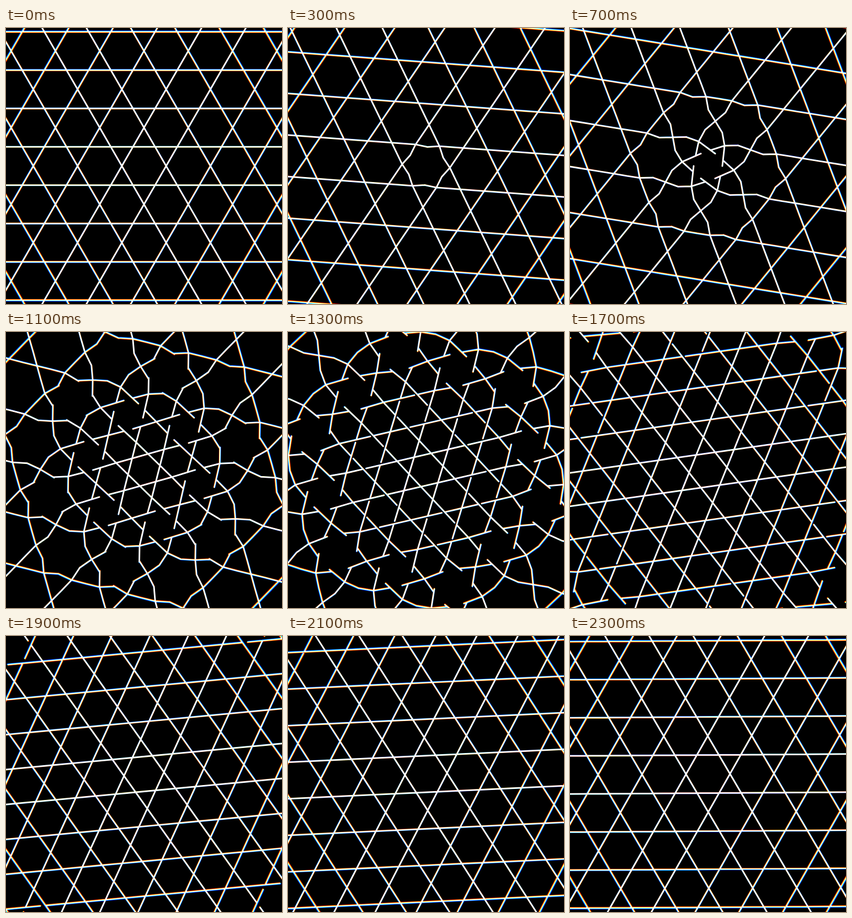
Recreate the animation shown at these times as an HTML page with a canvas. Size 500x500 px, loop 2400 ms.

```html
<!DOCTYPE html>
<html>
<head>
<meta charset="utf-8">
<style>
html, body { margin: 0; width: 100%; height: 100%; overflow: hidden; background: #000; }
canvas { display: block; }
</style>
</head>
<body>
<canvas id="stage" width="500" height="500"></canvas>
<script>
const ctx = document.getElementById('stage').getContext('2d');
const LOOP = 2400, STEP = 100;
const POSES = 78, POSE_MS = 30;
const ROOT3 = Math.sqrt(3), DEG = Math.PI / 180;
// Colour fringes: each channel has a slightly different scale.
const CHANNELS = [['#f00', 0.997], ['#0f0', 1], ['#00f', 1.003]];

function ease(x) {
  x = Math.min(1, Math.max(0, x));
  return x * x * (3 - 2 * x);
}

function polar(x, y, angle, length) {
  return [x + length * Math.cos(angle * DEG), y + length * Math.sin(angle * DEG)];
}

// One hexagon of unit radius: its edges fold inwards, then one arm of each pair grows on.
function addHexagon(path, x, y, progress) {
  const d = Math.hypot(x, y);
  const local = progress - 0.066 * d - 0.0027 * d * d;
  const fold = 30 * ease((local - 0.025) / 0.35);
  const short = 0.5 / Math.cos(fold * DEG);
  const long = short + ease((local - 0.157) / 0.36) / ROOT3;
  for (let a = 0; a < 360; a += 60) {
    const [vx, vy] = polar(x, y, a, 1);
    path.moveTo(...polar(vx, vy, a + 240 - fold, short));
    path.lineTo(vx, vy);
    path.lineTo(...polar(vx, vy, a + 120 + fold, long));
  }
}

function draw(progress) {
  const size = 40.13 * ROOT3 ** progress;
  const path = new Path2D();
  for (let j = -6; j <= 6; j++) {
    for (let i = -9; i <= 9; i++) {
      const x = 2 * i + j, y = j * ROOT3;
      if (Math.hypot(x, y) < 11) addHexagon(path, x, y, progress);
    }
  }

  ctx.setTransform(1, 0, 0, 1, 0, 0);
  ctx.globalCompositeOperation = 'source-over';
  ctx.fillStyle = '#000';
  ctx.fillRect(0, 0, 500, 500);
  ctx.globalCompositeOperation = 'lighter';
  ctx.lineCap = ctx.lineJoin = 'round';
  for (const [color, zoom] of CHANNELS) {
    ctx.setTransform(1, 0, 0, 1, 250, 250);
    ctx.rotate(30 * progress * DEG);
    ctx.scale(size * zoom, size * zoom);
    ctx.lineWidth = 2.9 / size;
    ctx.strokeStyle = color;
    ctx.stroke(path);
  }
}

function tick() {
  const ms = Math.floor(performance.now() % LOOP / STEP) * STEP;
  // The opening pose has no duration of its own beyond the first step.
  const pose = ms && Math.floor(ms / POSE_MS) + 1;
  draw(pose / POSES);
  requestAnimationFrame(tick);
}
tick();
</script>
</body>
</html>
```
